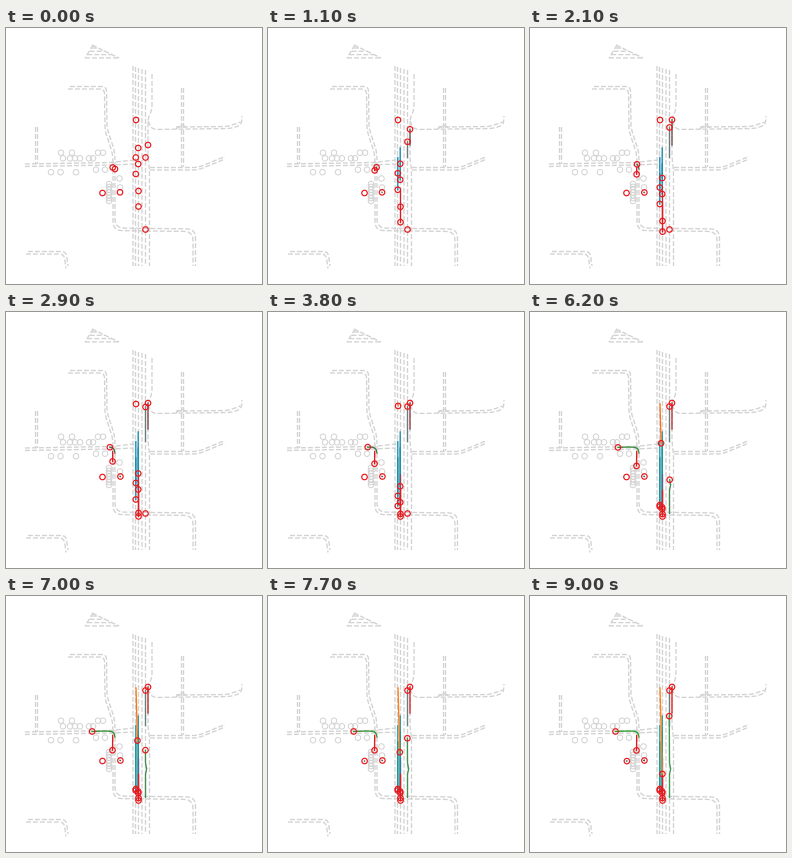
Write a matplotlib script that moves like this. It is 256 px wide and 256 px high and loops after 9.1 s.

```python
import numpy as np
import matplotlib.pyplot as plt
from matplotlib.animation import FuncAnimation
from matplotlib.colors import to_rgb
from matplotlib.patches import Circle

FRAMES, STEP = 91, 100
GRAY, RED = "#d2d2d2", "#e8171b"
RADIUS = 2.75

fig = plt.figure(figsize=(2.56, 2.56), dpi=100, facecolor="white")
ax = fig.add_axes([0, 0, 1, 1])
ax.set_xlim(0, 256)
ax.set_ylim(256, 0)
ax.axis("off")


def rounded(pts, r):
    """Replace each inner corner by a quadratic curve reaching r along its legs."""
    p = np.array(pts, float)
    out = [p[0]]
    for a, b, c in zip(p, p[1:], p[2:]):
        p0, p2 = (b + (q - b) * min(0.5, r / np.hypot(*(q - b))) for q in (a, c))
        out += [(1 - u) ** 2 * p0 + 2 * u * (1 - u) * b + u * u * p2 for u in np.linspace(0, 1, 6)]
    return np.array(out + [p[-1]])


def road(*pts, gap=(0, 0), r=5):
    """Dashed road edge, with a second edge shifted by gap."""
    p = rounded(pts, r)
    for shift in {(0, 0), gap}:
        ax.plot(*(p + shift).T, "--", color=GRAY, lw=0.95, snap=False, zorder=1)


def ring(x, y, color, lw, z):
    return ax.add_patch(Circle((x, y), RADIUS, fill=False, ec=color, lw=lw, zorder=z))


# Ramp at the top
for k in range(4):
    y = 20 + 3.3 * k
    road((86 - 2.3 * k, y), (92 + 7 * k, y))
road((87, 17), (79, 30))
road((86, 17), (113, 30))

# West side
road((64, 58.5), (100.5, 58.5), (101, 100), (108.5, 123), (109, 132), gap=(-2, 2.5))
road((19, 136), (105, 134.5), (128, 132))
road((19, 138.5), (105, 137), (128, 136))
road((29.5, 99), (29.5, 136), gap=(2, 0))
road((22, 223.5), (60, 223.5), (62, 238), gap=(-2, 2.5))

# Main avenue
for lane, x in enumerate((127, 129.5, 132.5, 136, 139.5)):
    road((x, 38 + lane), (x, 238))
road((146, 46), (146, 82), (142, 90), (142, 130), (143.5, 142), (143.5, 238))

# East side
road((142, 93), (146, 101.5), (225, 100.5), (235.5, 97), (236, 88))
road((170, 99), (222, 98.5), (234.5, 94))
road((175.5, 60), (175.5, 139), gap=(2, 0))
road((170, 101), (176, 96), (181, 101))
road((144, 139.5), (192, 139.5), (219, 128.5), gap=(0, 2.5))

# South loop
road((107, 134), (107, 202.5), (187, 203.5), (187, 238), r=9)
road((109, 134), (109, 200), (189.5, 201), (189.5, 238), r=9)

# Parked cars, row by row
rows = {124.7: (55, 66, 92, 97), 130.3: (57, 64, 69, 74, 83, 87),
        144.2: (45, 54.5, 70), 141.7: (90, 99), 150.5: (113.5,), 159.5: (114,)}
for y, xs in rows.items():
    for x in xs:
        ring(x, y, GRAY, 0.7, 2)
for y in np.linspace(156, 173, 7):
    ring(103, y, GRAY, 0.7, 2)

times = np.arange(FRAMES) * STEP / 1000


def drive(pts, speed, brake=5, start=0, ramp=0):
    """Positions of a car that pulls away, cruises along pts and brakes at the end."""
    p = np.array(pts, float)
    along = np.r_[0, np.cumsum(np.hypot(*np.diff(p, axis=0).T))]
    u = np.maximum(times - start, 0)
    if ramp:
        u = u - ramp * (1 - np.exp(-u / ramp))
    s, knee = speed * u, along[-1] - brake
    s = np.where(s < knee, s, along[-1] - brake * np.exp(-np.maximum(s - knee, 0) / brake))
    return np.column_stack([np.interp(s, along, col) for col in p.T])


def straight(x, y0, y1, **kw):
    return drive([(x, y0), (x, y1)], speed=14.3, **kw)


BLUE, TEAL, DARK = "#1487b8", "#20958c", "#555555"

# Path, trail colour at the start and at the end of the loop
cars = [
    (straight(142, 117, 91), DARK, RED),
    (straight(139.5, 129.5, 94.5), "#6c7a7c", "#5f8480"),
    (straight(132.2, 120, 195.5), BLUE, TEAL),
    (straight(129.8, 129.5, 193), BLUE, "#17a5b5"),
    (straight(132.2, 136, 197), BLUE, TEAL),
    (straight(129.8, 146, 194.5), BLUE, TEAL),
    (straight(132.5, 163, 202), RED, BLUE),
    (straight(132.5, 178.5, 204.5), RED, RED),
    (drive([(106.7, 139.5), (106.5, 154.5)], 4, brake=6, ramp=0.4), RED, RED),
    (drive(rounded([(109, 141), (107.5, 135.3), (98, 135), (85.5, 135.5)], 5), 5.1, brake=3, ramp=1.4),
     DARK, "#2ca02c"),
    (drive([(139.5, 201.5), (139.5, 178), (140.7, 173), (139.5, 167), (139.2, 110)], 17, start=3.9, ramp=0.3),
     DARK, "#3c9a50"),
    (drive([(130, 92), (132.7, 190)], 16.7, start=3.45, ramp=0.4), "#f4442c", "#ff8410"),
    (drive([(96.5, 165), (96.9, 165.1)], 0.4, brake=0.1, start=7.5), DARK, DARK),
    (drive([(114, 164.3), (114.4, 164.5)], 0.4, brake=0.1, start=1), DARK, DARK),
]

trails = [ax.plot([], [], lw=0.95, snap=False, zorder=3)[0] for _ in cars]
rings = [ring(*path[0], RED, 0.85, 4) for path, *_ in cars]


def draw(i):
    mix = i / (FRAMES - 1)
    for (path, first, last), line, dot in zip(cars, trails, rings):
        line.set_data(*path[:i + 1].T)
        line.set_color(np.array(to_rgb(first)) * (1 - mix) + np.array(to_rgb(last)) * mix)
        dot.center = path[i]
    return trails + rings


anim = FuncAnimation(fig, draw, frames=FRAMES, interval=STEP, repeat=True, repeat_delay=0)
plt.show()
```
